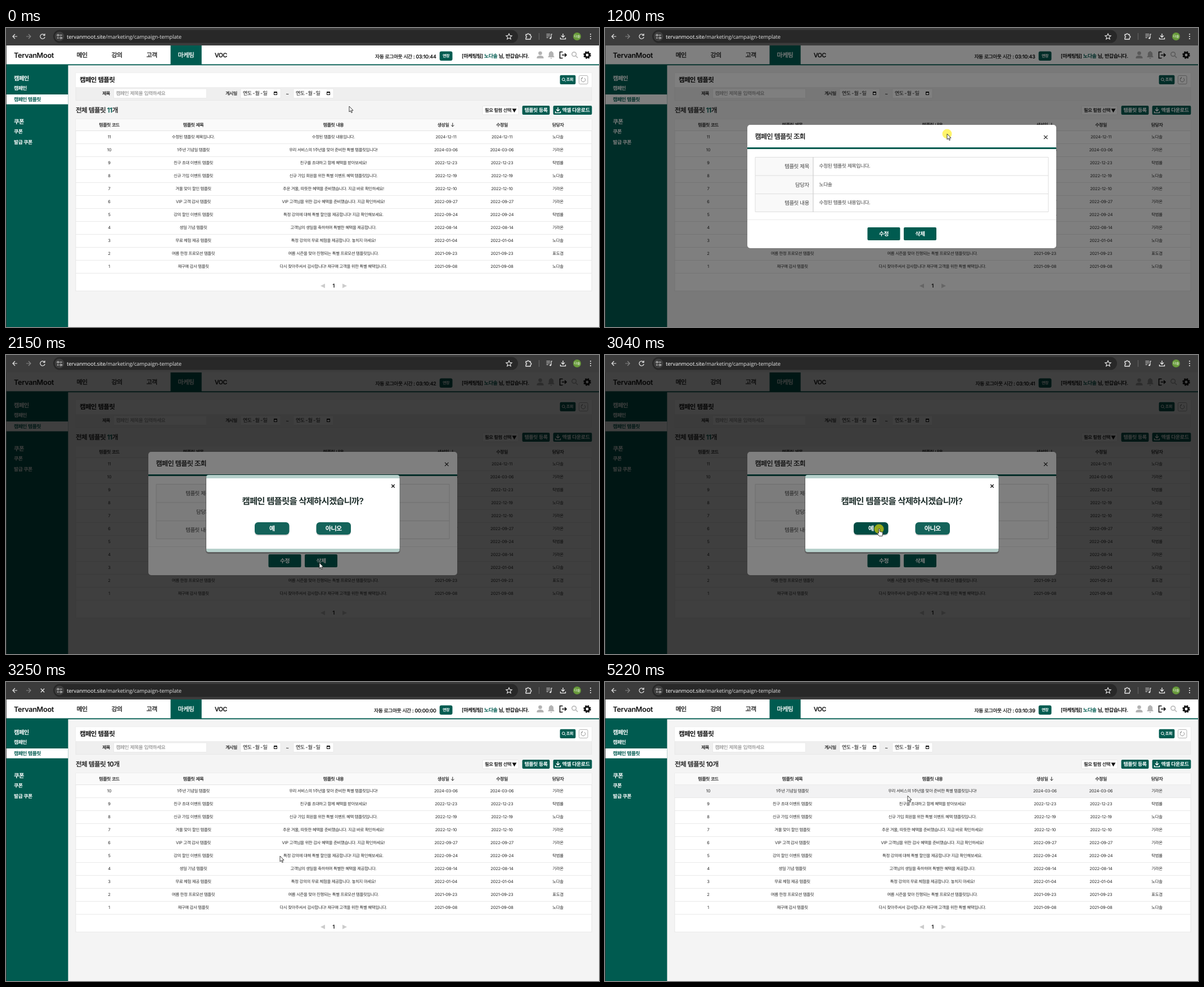
An HTML page that plays this animation: 1054x531 px, repeating every 5620 ms.

```html
<!DOCTYPE html>
<html>
<head>
<meta charset="utf-8">
<title>캠페인 템플릿</title>
<style>
html, body { margin: 0; width: 100%; height: 100%; overflow: hidden; background: #f4f4f4; }
svg { display: block; width: 100%; height: 100%; }
text {
  font-family: Inter, "Noto Sans CJK KR", "Noto Sans CJK", sans-serif;
  letter-spacing: -.025em; text-rendering: geometricPrecision; white-space: pre;
}
.k { letter-spacing: -.056em; }
.url { font-family: "Open Sans", "Noto Sans", sans-serif; letter-spacing: -.01em; }
</style>
</head>
<body>
<svg id="stage" viewBox="0 0 1054 531" xmlns="http://www.w3.org/2000/svg"></svg>
<script>
const LOOP = 5620, GREEN = '#005b50', ROW = 23, TOP = 182;
const BRAND = 'TervanMoot', USER = '노다솔', CALM = '기라온', FIRM = '탁범률', KEEN = '표도겸';

const hangul = s => s.replace(/[가-힣]+/g, '<tspan class="k">$&</tspan>');
// Medium weight gets a hairline outline, since the Korean font has no medium cut.
const text = (x, y, s, size, o = {}) =>
  `<text x="${x}" y="${y}" font-size="${size}" font-weight="${o.w || 400}" fill="${o.c || '#111'}"` +
  (o.w === 500 ? ` stroke="${o.c || '#111'}" stroke-width="${size * .024}"` : '') +
  ` text-anchor="${o.a || 'start'}"${o.id ? ` id="${o.id}"` : ''}>${o.raw || hangul(s)}</text>`;
const mid = (x, y, s, size, o) => text(x, y, s, size, { a: 'middle', ...o });
const rect = (x, y, w, h, fill, more = '') =>
  `<rect x="${x}" y="${y}" width="${w}" height="${h}" fill="${fill}" ${more}/>`;
const line = (d, c, w = 1.2, more = '') =>
  `<path d="${d}" fill="none" stroke="${c}" stroke-width="${w}" ${more}/>`;
const shape = (d, c, more = '') => `<path d="${d}" fill="${c}" ${more}/>`;
const circle = (x, y, r, fill, more = '') => `<circle cx="${x}" cy="${y}" r="${r}" fill="${fill}" ${more}/>`;
const group = (id, body, more = '') => `<g id="${id}" ${more}>${body}</g>`;
const cross = (x, y, r, c, w) => line(`M${x - r} ${y - r}l${2 * r} ${2 * r}m0 ${-2 * r}l${-2 * r} ${2 * r}`, c, w);
const lens = (x, y, r, c, w) =>
  circle(x, y, r, 'none', `stroke="${c}" stroke-width="${w}"`) +
  line(`M${x + r * .7} ${y + r * .7}l${r} ${r}`, c, w);
const button = (x, y, w, h, label, size, rx = 2) =>
  rect(x, y, w, h, GREEN, `rx="${rx}"`) +
  mid(x + w / 2, y + h / 2 + size * .36, label, size, { w: 600, c: '#fff' });
const tray = (x, y, c) => line(`M${x} ${y - 5}v6.5m-3 -3l3 3l3 -3M${x - 4.5} ${y + 2}v2.6h9v-2.6`, c, 1.4);

function toolbar() {
  const w = '#e6e6e6';
  return rect(0, 0, 1054, 31, '#3c3c3c') +
    rect(84, 3.5, 826, 23, '#282828', 'rx="11.5"') +
    line('M20 15h-8m4 -4l-4 4l4 4', w) +
    line('M36 15h8m-4 -4l4 4l-4 4', '#858585') +
    group('reload', line('M68.3 12.4a4.2 4.2 0 1 0 .8 3.6M69 10v3.2h-3.2', w)) +
    group('stop', cross(65, 15, 3.2, w, 1.3)) +
    circle(95, 15, 8.5, '#3f3f3f') +
    line('M91 12.8h3.4M97.6 17.6h2.6M95.6 12.8h4M91 17.6h2.6', w, 1.1) +
    circle(92.4, 12.8, 1.5, '#3f3f3f', `stroke="${w}"`) + circle(97.4, 17.6, 1.5, '#3f3f3f', `stroke="${w}"`) +
    `<text class="url" x="108" y="18.5" font-size="9.5" fill="#fff">${BRAND.toLowerCase()}.site` +
    `<tspan fill="#dedede">/marketing/campaign-template</tspan></text>` +
    line('M894 10l1.5 3.4l3.7 .4l-2.8 2.4l.8 3.6l-3.2 -1.9l-3.2 1.9l.8 -3.6l-2.8 -2.4l3.7 -.4z', w, 1.1) +
    line('M924 11.5h2.5a1.6 1.6 0 0 1 3.2 0h2.5v2.6a1.6 1.6 0 0 1 0 3.2v2.7h-8.2v-2.8a1.5 1.5 0 0 0 0 -3z', w, 1.3) +
    line('M947.5 9v12', '#666', 1) +
    line('M960.5 11h6.5m-6.5 3h6.5m-6.5 3h3.6M969 18v-7h2', w, 1.2) + circle(967.6, 18, 1.6, w) +
    tray(990, 15, w) +
    circle(1015, 15, 7, '#679a3a') + mid(1015, 17.4, USER.slice(1), 6, { c: '#fff' }) +
    [11, 15, 19].map(y => circle(1039, y, 1.1, w)).join('');
}

function header() {
  const g = '#b3b3b3';
  const nav = [['메인', 135], ['강의', 197], ['고객', 259], ['마케팅', 320], ['VOC', 382]];
  return rect(0, 31, 1054, 34, '#fff') + rect(0, 64.4, 1054, 1.8, GREEN) +
    text(14, 52.5, BRAND, 12.7, { w: 600 }) + rect(292.5, 31, 55.2, 34, GREEN) +
    nav.map(([s, x]) => mid(x, 51.5, s, s === 'VOC' ? 10.5 : 11.1, { w: 500, c: x === 320 ? '#fff' : '#111' })).join('') +
    text(764.5, 54, '', 8.9, { a: 'end', w: 500, id: 'clock' }) +
    button(770.7, 41.5, 22.8, 16.5, '연장', 7.2, 3) +
    text(810, 53, '', 9.1, { w: 600, raw: hangul('[마케팅팀] ') + `<tspan fill="${GREEN}">${hangul(USER)}</tspan>` + hangul(' 님, 반갑습니다.') }) +
    circle(949.5, 44.8, 3.3, g) + shape('M943.5 54v-1.6c0 -4.6 12 -4.6 12 0v1.6z', g) +
    shape('M963.5 52v-1l1.3 -1.4v-3.6c0 -5.6 8.4 -5.6 8.4 0v3.6l1.3 1.4v1zM967.5 53h3a1.5 1.5 0 0 1 -3 0z', g) + rect(968.2, 41, 1.6, 2, g) +
    line('M989.5 42.5h-5v11h5M988 48h8m-3 -3l3 3l-3 3', '#111', 1.6) +
    lens(1009.7, 46.5, 3.8, g, 1.5) +
    circle(1033, 48, 3.9, 'none', 'stroke="#111" stroke-width="3"') +
    circle(1033, 48, 5.6, 'none', 'stroke="#111" stroke-width="2.4" stroke-dasharray="2.6 1.798"');
}

function sidebar() {
  const c = '#fff';
  return rect(0, 66, 110.4, 465, GREEN) + rect(0, 118, 110.4, 17.5, '#fff') +
    text(14, 92.7, '캠페인', 10.3, { w: 700, c }) + text(14, 110.2, '캠페인', 8.9, { w: 600, c }) +
    text(14, 130, '캠페인 템플릿', 8.9, { w: 600, c: GREEN }) +
    text(14, 169.7, '쿠폰', 10.3, { w: 700, c }) + text(14, 187, '쿠폰', 8.9, { w: 600, c }) +
    text(14, 206.2, '발급 쿠폰', 8.9, { w: 600, c });
}

function dateField(x) {
  const parts = [['연도', 4], ['-', 21.2], ['월', 25.6], ['-', 35], ['일', 39.5]];
  return rect(x, 108, 71, 16.5, '#fff', 'stroke="#e2e2e2" stroke-width=".6"') +
    parts.map(([s, dx]) => text(x + dx, 119.3, s, 9.1)).join('') +
    rect(x + 59.5, 113.5, 5, 5, 'none', 'stroke="#111"') + rect(x + 59, 113, 6, 2, '#111');
}

function filters() {
  return rect(124, 80, 917, 48.5, '#efefef', 'stroke="#e6e6e6" stroke-width=".8"') + rect(124, 80, 917, 25, '#fff') +
    text(131, 96, '캠페인 템플릿', 11.5, { w: 600 }) +
    rect(984.6, 83.7, 27.8, 16.3, GREEN, 'rx="2"') + lens(990.8, 91.2, 2.4, '#fff', 1) + mid(1002, 94.4, '조회', 7.2, { w: 600, c: '#fff' }) +
    rect(1018.5, 84.5, 15.5, 15, '#fff', 'rx="2" stroke="#aaa" stroke-width=".9"') +
    line('M1024 88.9a3.7 3.7 0 1 0 4 0M1024.4 87v2.4h-2.4', '#888', .9) +
    mid(178, 118.8, '제목', 7.9, { w: 500 }) +
    rect(191.5, 108, 165, 16.5, '#fff', 'stroke="#e2e2e2" stroke-width=".6"') +
    text(195.5, 119.2, '캠페인 제목을 입력하세요', 8.75, { c: '#7a7a7a' }) +
    mid(400.5, 118.8, '게시일', 7.9, { w: 500 }) + dateField(417) + mid(500, 120, '~', 8.8) + dateField(511);
}

function actions() {
  return text(124, 150, '', 11.6, { w: 500, id: 'total' }) +
    rect(847, 138.5, 64, 15.5, '#fff', 'rx="1.5" stroke="#e0e0e0" stroke-width=".8"') +
    text(851, 149.4, '필요 컬럼 선택', 8.3, { w: 500 }) + shape('M899.5 143.2h8l-4 7z', '#111') +
    button(917.6, 137.9, 48.8, 16.2, '템플릿 등록', 9) +
    rect(972.6, 137.9, 68.8, 16.2, GREEN, 'rx="2"') + tray(981, 146, '#fff') +
    text(988.5, 149.3, '엑셀 다운로드', 9.05, { w: 600, c: '#fff' });
}

const COLUMNS = [183.5, 333, 582, 782, 881.5, 981];
const ITEMS = [
  ['수정된 템플릿 제목입니다.', '수정된 템플릿 내용입니다.', '2024-12-11', USER],
  ['1주년 기념일 템플릿', '우리 서비스의 1주년을 맞아 준비한 특별 템플릿입니다!', '2024-03-06', CALM],
  ['친구 초대 이벤트 템플릿', '친구를 초대하고 함께 혜택을 받아보세요!', '2022-12-23', FIRM],
  ['신규 가입 이벤트 템플릿', '신규 가입 회원을 위한 특별 이벤트 혜택 템플릿입니다.', '2022-12-19', USER],
  ['겨울 맞이 할인 템플릿', '추운 겨울, 따뜻한 혜택을 준비했습니다. 지금 바로 확인하세요!', '2022-12-10', CALM],
  ['VIP 고객 감사 템플릿', 'VIP 고객님을 위한 감사 혜택을 준비했습니다. 지금 확인하세요!', '2022-09-27', CALM],
  ['강의 할인 이벤트 템플릿', '특정 강의에 대해 특별 할인을 제공합니다! 지금 확인해보세요.', '2022-09-24', FIRM],
  ['생일 기념 템플릿', '고객님의 생일을 축하하며 특별한 혜택을 제공합니다.', '2022-08-14', CALM],
  ['무료 체험 제공 템플릿', '특정 강의의 무료 체험을 제공합니다. 놓치지 마세요!', '2022-01-04', USER],
  ['여름 한정 프로모션 템플릿', '여름 시즌을 맞아 진행되는 특별 프로모션 템플릿입니다.', '2021-09-23', KEEN],
  ['재구매 감사 템플릿', '다시 찾아주셔서 감사합니다! 재구매 고객을 위한 특별 혜택입니다.', '2021-09-08', USER]
];

function table() {
  const heads = ['템플릿 코드', '템플릿 제목', '템플릿 내용', '생성일', '수정일', '담당자'];
  const row = ([title, body, date, who], i) => {
    const cells = [String(ITEMS.length - i), title, body, date, date, who];
    return group('row' + i, cells.map((s, c) => mid(COLUMNS[c], TOP + ROW * i + 14.3, s, 7.45, { c: '#2c2c2c' })).join('') +
      line(`M124 ${TOP + ROW * (i + 1) + .5}h917`, '#e9e9e9', 1));
  };
  return rect(124, 162, 917, 305, '#fff', 'id="card" stroke="#e3e3e3" stroke-width=".8"') +
    rect(124, 162, 917, 20, '#fafafa') +
    heads.map((s, c) => mid(COLUMNS[c] - (c === 3 ? 5 : 0), 174.8, s, 8, { w: 500, c: '#222' })).join('') +
    line('M793.8 168.5v6.6m-2.6 -2.6l2.6 2.6l2.6 -2.6', '#111', .9) +
    line(`M124 ${TOP + .5}h917`, '#e4e4e4', 1) +
    rect(124, TOP, 917, ROW, '#f2f2f3', 'id="hover"') +
    group('rows', ITEMS.map(row).join('') +
      shape('M567 454v8l-8 -4zM598 454v8l8 -4z', '#ccc') + mid(582.3, 461.4, '1', 9.2, { w: 500 }));
}

function detail() {
  const fields = [['템플릿 제목', ITEMS[0][0]], ['담당자', USER], ['템플릿 내용', ITEMS[0][1]]];
  return rect(0, 31, 1054, 500, '#000', 'opacity=".5"') +
    rect(253, 172, 549, 219, '#fff', 'rx="5"') +
    text(266.5, 196.7, '캠페인 템플릿 조회', 12.1, { w: 500 }) + cross(783.3, 194, 3.2, '#222', 1.2) +
    rect(253, 212, 549, 3, GREEN) + rect(267, 229, 103, 98, '#f9f9f9') +
    line('M267 229.5h521v97h-521zM267 262h521M267 294.5h521', '#dedede', 1) + line('M370 229v98', '#d2d2d2', 1.3) +
    fields.map(([k, v], i) => text(362.7, 249 + 32.6 * i, k, 9.5, { a: 'end', c: '#444' }) +
      text(380.5, 248 + 32.6 * i, v, 8.85, { c: '#444' })).join('') +
    line('M253 340.5h549', '#ececec', 1) +
    button(466.5, 354, 58, 23, '수정', 9.8) + button(531, 354, 58, 23, '삭제', 9.8);
}

function confirmBox() {
  const choice = (x, s, id) => rect(x, 299, 61.5, 22, '#000', 'rx="6" opacity=".16"') +
    rect(x, 297, 61.5, 22, '#14635a', `rx="6" id="${id}"`) + mid(x + 30.7, 311.7, s, 11.1, { w: 600, c: '#fff' });
  return rect(0, 31, 1054, 500, '#000', 'opacity=".5"') +
    rect(355, 214, 345.5, 139, '#000', 'rx="5" opacity=".25"') +
    rect(356, 213, 343.5, 137, '#b6d0cb', 'rx="4"') + rect(356, 219, 343.5, 125, '#fff') +
    cross(688, 232.7, 2.7, '#111', 1.4) +
    mid(527.5, 265.3, '캠페인 템플릿을 삭제하시겠습니까?', 15.5, { w: 600, c: '#20302d' }) +
    choice(442, '예', 'yes') + choice(551.5, '아니오', 'no');
}

const pointer = group('click', circle(0, 0, 8.5, '#ffec00', 'opacity=".58"')) +
  group('arrow', shape('M0 0v10l2.3 -2.1l1.6 3.6l1.6 -.7l-1.6 -3.5h3.1z', '#fff', 'stroke="#111" stroke-width=".8"')) +
  group('hand', shape('M-.6 .6c0 -1.6 2 -1.6 2 0v4l4 1c1 .3 1.3 1 1.2 2l-.6 5h-5.6l-3.3 -4.6c-.6 -1 .6 -1.8 1.4 -1l.9 .9z', '#fff', 'stroke="#111" stroke-width=".8"'));

const stage = document.getElementById('stage');
stage.innerHTML = rect(0, 0, 1054, 531, '#f4f4f4') + header() + sidebar() + filters() + actions() + table() +
  group('detail', detail()) + group('confirm', confirmBox()) + toolbar() +
  rect(0, 31, .8, 500, '#333') + group('pointer', pointer);

const $ = id => document.getElementById(id);
const show = (id, on) => $(id).setAttribute('display', on ? 'inline' : 'none');
const within = (t, a, b) => t >= a && t < b;

// Pointer moves: first change, last change, step count, end point.
const MOVES = [
  [520, 930, 6, 608, 188], [1450, 1950, 8, 556, 368], [2150, 2150, 1, 557, 369], [2350, 2770, 7, 487, 309],
  [4030, 4030, 1, 483, 275], [4090, 4560, 8, 538, 165], [4630, 4690, 2, 538, 202]
];
const CLOCK = [[0, '03:10:44'], [1000, '03:10:43'], [2010, '03:10:42'], [3000, '03:10:41'],
  [3250, '00:00:00'], [4220, '03:10:40'], [5220, '03:10:39']];

function pointerAt(t) {
  let x = 610, y = 139;
  for (const [a, b, n, ex, ey] of MOVES) {
    if (t < a) break;
    const step = n > 1 ? Math.min(n, Math.floor((t - a) / (b - a) * (n - 1) + 1.001)) : 1;
    const u = step / n, e = u * u * (3 - 2 * u);
    x += (ex - x) * e;
    y += (ey - y) * e;
  }
  return [x, y];
}

function draw(t) {
  const [x, y] = pointerAt(t);
  const removed = t >= 3250, count = ITEMS.length - removed;
  const detailOpen = within(t, 1200, 3250), confirmOpen = within(t, 2150, 3050);
  const loading = within(t, 3120, 3370);
  const onYes = confirmOpen && x < 503 && y > 297 && y < 319;
  const onDelete = detailOpen && !confirmOpen && x > 531 && x < 589 && y > 354 && y < 377;

  show('detail', detailOpen);
  show('confirm', confirmOpen);
  show('reload', !loading);
  show('stop', loading);
  show('row0', !removed);
  $('rows').setAttribute('transform', `translate(0 ${removed ? -ROW : 0})`);
  $('card').setAttribute('height', 52 + ROW * count);
  const ink = removed ? '#111' : GREEN;
  $('total').innerHTML = hangul('전체 템플릿 ') + `<tspan fill="${ink}" stroke="${ink}">${count}</tspan>` + hangul('개');
  $('clock').innerHTML = hangul('자동 로그아웃 시간 : ' + CLOCK.filter(c => c[0] <= t).pop()[1]);
  $('yes').setAttribute('fill', onYes ? '#004c43' : '#14635a');

  // The row highlight trails the pointer by one step.
  const row = Math.floor((pointerAt(Math.max(0, t - 55))[1] - TOP) / ROW);
  show('hover', row >= 0 && row < count && !detailOpen && !loading);
  $('hover').setAttribute('y', TOP + ROW * row + .5);

  $('pointer').setAttribute('transform', `translate(${x} ${y})`);
  show('click', within(t, 1130, 1250) || within(t, 2060, 2150) || within(t, 2910, 3050));
  show('hand', onYes || onDelete);
  show('arrow', !(onYes || onDelete));
}

const start = performance.now();
function frame() {
  draw((performance.now() - start) % LOOP);
  requestAnimationFrame(frame);
}
frame();
</script>
</body>
</html>
```
